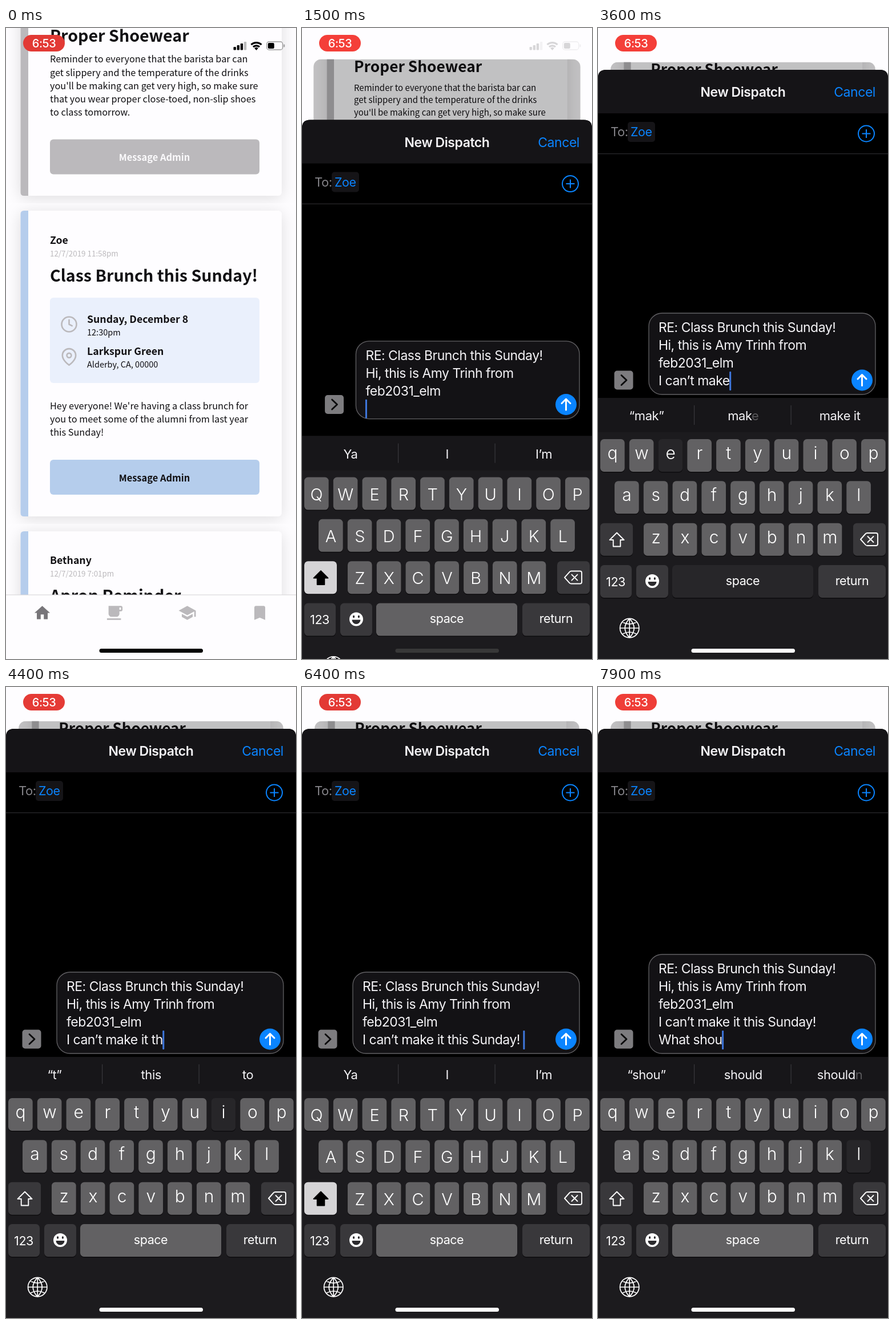
Recreate the animation shown at these times as an HTML page. Size 508 by 1102 pixels, loop 8 s.

```html
<!DOCTYPE html>
<html lang="en">
<head>
<meta charset="utf-8">
<title>Message admin</title>
<style>
html, body { margin: 0; height: 100%; overflow: hidden; background: #fefdff; }
svg { display: block; width: 100vw; height: 100vh; }
text { font-family: Inter, "Liberation Sans", sans-serif; letter-spacing: -.45px; white-space: pre; }
.card text { font-family: "Noto Sans CJK JP", "Noto Sans CJK SC", "Noto Sans CJK", sans-serif; letter-spacing: 0; }
.shadow { filter: drop-shadow(0 4px 14px rgba(0, 0, 0, .13)); }
</style>
</head>
<body>
<svg id="stage" viewBox="0 0 508 1102"></svg>
<script>
const INK = '#111013', GREY = '#bbb9bc', SKY = '#b5cdec', BLUE = '#0a84ff', WHITE = '#fefdff';
const LOOP = 8000, PRESS = 110, RELEASE = 25;

const rect = (x, y, w, h, r, fill, more = '') =>
  `<rect x="${x}" y="${y}" width="${w}" height="${h}" rx="${r}" fill="${fill}" ${more}/>`;
const text = (x, y, s, size, fill = INK, more = '') =>
  `<text x="${x}" y="${y}" font-size="${size}" fill="${fill}" ${more}>${s}</text>`;
const line = (d, color, w, more = '') =>
  `<path d="${d}" fill="none" stroke="${color}" stroke-width="${w}" ${more}/>`;
const MID = 'text-anchor="middle"', BOLD = 'font-weight="600"', ROUND = 'stroke-linecap="round" stroke-linejoin="round"';

// ---- Feed behind the sheet ----
const paragraph = (y, lines) => lines.map((s, i) => text(77, y + i * 23.2, s, 16.3)).join('');
const button = (y, fill, ink, id) =>
  `<g id="${id}">${rect(77, y, 367, 61, 6, fill)}${text(260, y + 37.5, 'Message Admin', 16.4, ink, MID + ' ' + BOLD)}</g>`;
const card = (y, h, color, from, to, body) => `
  <clipPath id="cell${to}"><rect y="${from}" width="508" height="${to - from}"/></clipPath>
  <g class="card" clip-path="url(#cell${to})">
    ${rect(25.5, y, 457.5, h, 6, WHITE, 'class="shadow"')}
    <path d="M39 ${y}H31.5q-6 0-6 6v${h - 12}q0 6 6 6H39z" fill="${color}"/>${body}
  </g>`;
const head = (y, name, date, title) =>
  text(77, y, name, 17.7, INK, BOLD) + text(77, y + 21.5, date, 13.4, GREY) + text(77, y + 66, title, 28.6, INK, BOLD);
const place = (y, a, b) => text(142, y, a, 17.7, INK, BOLD) + text(142, y + 22, b, 14.5);
const tab = (x, d, fill = GREY) =>
  `<path transform="translate(${x - 16.3} 1005.2) scale(1.36)" fill="${fill}" d="${d}"/>`;

const feed = rect(0, 0, 508, 1102, 0, WHITE)
  + card(-300, 593, GREY, -320, 306,
    text(77, 24, 'Proper Shoewear', 28.6, INK, BOLD)
    + paragraph(60.3, ['Reminder to everyone that the barista bar can', 'get slippery and the temperature of the drinks',
      'you\'ll be making can get very high, so make sure', 'that you wear proper close-toed, non-slip shoes', 'to class tomorrow.'])
    + button(194.5, GREY, '#fbfafc', 'oldButton'))
  + card(319, 534, SKY, 306, 866,
    head(377, 'Zoe', '12/7/2019 11:58pm', 'Class Brunch this Sunday!')
    + rect(77, 471, 367, 149, 6, '#eaf0fc')
    + `<g transform="translate(94.9 501.9) scale(1.3)">${line('M2 12a10 10 0 1 0 20 0a10 10 0 1 0-20 0M12 6v6l4 2', GREY, 2, ROUND)}</g>`
    + `<g transform="translate(94.9 558.8) scale(1.3)">${line('M21 10c0 7-9 13-9 13s-9-6-9-13a9 9 0 0 1 18 0zM9 10a3 3 0 1 0 6 0a3 3 0 1 0-6 0', GREY, 2, ROUND)}</g>`
    + place(514.5, 'Sunday, December 8', '12:30pm') + place(571, 'Larkspur Green', 'Alderby, CA, 00000')
    + paragraph(666, ['Hey everyone! We\'re having a class brunch for', 'you to meet some of the alumni from last year', 'this Sunday!'])
    + button(754, SKY, INK, 'button'))
  + card(879, 500, SKY, 866, 1400, head(936, 'Bethany', '12/7/2019 7:01pm', 'Apron Reminder'))
  + rect(0, 990, 508, 112, 0, WHITE) + rect(0, 989.5, 508, 1, 0, '#d5d4d6')
  + tab(63.5, 'M10 20v-6h4v6h5v-8h3L12 3 2 12h3v8z', '#777579')
  + tab(190.5, 'M20 3H4v10c0 2.2 1.8 4 4 4h6c2.2 0 4-1.8 4-4v-3h2c1.1 0 2-.9 2-2V5c0-1.1-.9-2-2-2zm0 5h-2V5h2zM2 21h18v-2H2z')
  + tab(317.5, 'M5 13.2v4L12 21l7-3.8v-4L12 17zM12 3L1 9l11 6 9-4.9V17h2V9z')
  + tab(444.5, 'M17 3H7c-1.1 0-2 .9-2 2v16l7-3 7 3V5c0-1.1-.9-2-2-2z');

const status = [0, 1, 2, 3].map(i => rect(398.5 + i * 6.1, 33 - i * 3, 4.4, 5.5 + i * 3, 1, i < 3 ? '#000' : '#bbb')).join('')
  + line('M429.5 29.2a13 13 0 0 1 18 0M433 33a8 8 0 0 1 11 0', '#000', 3.2)
  + '<path d="M435.2 35.3a5 5 0 0 1 6.6 0L438.5 39z"/>'
  + rect(456.7, 24, 28, 14, 4, 'none', 'stroke="#999" stroke-width="1.3"')
  + rect(458.8, 26, 11, 10, 2, '#000') + rect(486.3, 28.5, 2, 5, 1, '#999');

// ---- Message sheet ----
const sheet = '<path d="M0 1300V87q0-14 14-14H494q14 0 14 14V1300z"/>'
  + '<path d="M0 149V87q0-14 14-14H494q14 0 14 14V149z" fill="#151417"/>'
  + text(254, 120, 'New Dispatch', 23, '#f4f3f6', MID + ' ' + BOLD) + text(486, 120, 'Cancel', 23, BLUE, 'text-anchor="end"')
  + text(22, 189, 'To:', 22, '#858489') + rect(52, 164, 48, 35, 5, '#151417') + text(57, 189, 'Zoe', 21.5, BLUE)
  + rect(0, 219, 508, 1.2, 0, '#2b2a2d')
  + line('M456 184.5a14 14 0 1 0 28 0a14 14 0 1 0-28 0M462.5 184.5h15M470 177v15', BLUE, 2);

document.getElementById('stage').innerHTML = `
  <defs>
    <clipPath id="screen"><rect id="screenBox" width="508" height="1102"/></clipPath>
    <clipPath id="inside"><rect id="insideBox"/></clipPath>
  </defs>
  ${rect(0, 0, 508, 1102, 0, WHITE)}
  <g id="feed"><g clip-path="url(#screen)">${feed}${rect(0, 0, 508, 1102, 0, '#000', 'id="dim"')}</g></g>
  <g id="status">${status}</g>
  ${rect(30, 12, 73, 29, 14.5, '', 'id="pill"')}${text(66.5, 33.7, '6:53', 20, '#fff', MID + ' font-weight="500"')}
  <g id="sheet">${sheet}</g>
  <g id="more">${rect(28.5, 598.5, 33, 33, 5, '#7d7c7f')}${line('M41 606.5l9 8.5l-9 8.5', '#0b0b0c', 2.8, ROUND)}</g>
  ${rect(0, 0, 0, 0, 23, '#131215', 'id="bubble" stroke="#626164" stroke-width="1.3"')}
  <g clip-path="url(#inside)"><g id="message">
    ${['RE: Class Brunch this Sunday!', 'Hi, this is Amy Trinh from', 'feb2031_elm', '', ''].map((s, i) =>
      text(106, 33 + i * 31, s, 23, '#f4f3f6', `id="row${i}" style="letter-spacing:-.52px"`)).join('')}
    ${rect(0, 0, 3, 33, 1, '#3f77dd', 'id="caret"')}
  </g></g>
  <g id="send"><circle cx="462.5" cy="615" r="18.5" fill="${BLUE}"/>${line('M462.5 624.5v-18M455 613l7.5-7.5l7.5 7.5', '#fff', 3, ROUND)}</g>
  <g id="board"><g id="keys"></g></g>
  ${rect(163.5, 1084, 181.5, 7, 3.5, '', 'id="bar"')}`;

const $ = Object.fromEntries([...document.querySelectorAll('[id]')].map(e => [e.id, e]));
const set = (el, attrs) => { for (const k in attrs) el.setAttribute(k, attrs[k]); };
const move = (el, x, y, s = 1) => el.setAttribute('transform', `translate(${x} ${y}) scale(${s})`);

// ---- Typing ----
// [time the key is released, key]
const strokes = [
  [2270, 'I'], [2420, ' '], [2560, 'c'], [2680, 'a'], [2800, 'n'], [2920, 't'], [3050, ' '],
  [3200, 'm'], [3330, 'a'], [3460, 'k'], [3590, 'e'], [3680, ' '], [3820, 'i'], [3950, 't'], [4080, ' '],
  [4230, 't'], [4370, 'h'], [4500, 'i'], [4640, 's'], [4780, ' '], [4920, 'shift'], [5040, 'S'], [5160, 'u'],
  [5270, 'n'], [5390, 'd'], [5510, 'a'], [5630, 'y'], [5820, '123'], [6080, '!'], [6280, ' '], [6680, 'return'],
  [6920, 'W'], [7030, 'h'], [7140, 'a'], [7250, 't'], [7380, ' '], [7510, 's'], [7630, 'h'], [7750, 'o'], [7870, 'u'], [7990, 'l']];

// Text after ~ is still fading in
const hints = [
  [0, 'Ya|I|I’m'], [2380, '“I”|I’m|I’ll'], [2480, 'am|have|don’t'], [2620, '“c”|can|could'], [2740, '“ca”|can|call'],
  [2860, '“can”|can’t|cannot'], [2980, '“cant”|can’t|can'], [3110, 'wait|believe|do'], [3260, '“m”|make|my'],
  [3400, '“ma”|make|may'], [3520, '“mak”|mak~e|make it'], [3740, 'it|sure|the'], [3880, '“i”|it|in'], [4010, '“it”|its|it’s'],
  [4140, 'to|today|tomorrow'], [4290, '“t”|this|to'], [4430, '“th”|this|the'], [4700, '“this”|this|things'],
  [4840, 'week|weekend|morning'], [4960, 'Week|Weekend|Morning'], [5130, 'Sunday|Weekend|Morning'],
  [5340, '“Sun”|Sunday|Sunny'], [5700, '“Sunday”|Sunday|Sundays'], [6320, 'Ya|I|I’m'], [6980, '“W”|We|What'],
  [7200, '“Wha”|What|What’s'], [7430, 'is|are|do'], [7560, '“s”|should|she'], [7800, '“sho”|should|show'], [7880, '“shou”|should|should~n']];

function typed(t) {
  let s = '', mode = 'upper';
  for (const [at, key] of strokes) {
    if (at > t) break;
    if (key === 'shift') mode = 'upper';
    else if (key === '123') mode = 'symbol';
    else if (key === 'return') { s += '\n'; mode = 'upper'; }
    else {
      s = (s + key).replace('cant ', 'can’t ').replace('! \n', '!\n');
      if (mode === 'upper') mode = 'lower';
      else if (key === ' ' && mode === 'symbol') mode = 'upper';
    }
  }
  return { lines: s.split('\n'), mode };
}

function keyboard(mode, down, words) {
  const upper = mode === 'upper', symbol = mode === 'symbol';
  const cap = (x, y, w, fill) => rect(x, y + 1.5, w, 57, 6.5, '#0d0c0e') + rect(x, y, w, 57, 6.5, fill);
  const light = k => down.includes(k) ? '#272629' : '#626163';
  const dark = k => down.includes(k) ? '#626163' : '#39383b';
  const row = (chars, x, y, w = 42.7, step = 50.78) => [...chars].map((c, i) =>
    cap(x + i * step, y, w, light(c)) + (mode === 'lower'
      ? text(x + i * step + w / 2, y + 35, c, 30, '#fff', MID + ' font-weight="300"')
      : text(x + i * step + w / 2, y + 40, c.toUpperCase(), 29, '#fff', MID + ' font-weight="300"'))).join('');
  const label = (x, s, y = 972.5) => text(x, y, s, 21.5, '#fff', MID);

  let out = rect(0, 646, 508, 900, 0, '#1c1b1e') + rect(0, 646, 508, 60, 0, '#171619')
    + rect(168, 659, 1.2, 34, 0, '#39383c') + rect(337.5, 659, 1.2, 34, 0, '#39383c');
  words.split('|').forEach((w, i) => {
    const [shown, faint = ''] = w.split('~');
    out += text(85 + i * 169.3, 685, `${shown}<tspan opacity=".3">${faint}</tspan>`, 22, '#f4f3f6', MID);
  });
  if (symbol) {
    out += row('1234567890', 4, 718) + row('-/:;()$&@"', 4, 791.3) + row('.,?!’', 80, 864.7, 63, 71.2)
      + cap(4, 864.7, 57, '#39383b') + label(32.5, '#+=', 900);
  } else {
    out += row('qwertyuiop', 4, 718) + row('asdfghjkl', 29, 791.3) + row('zxcvbnm', 80, 864.7)
      + cap(4, 864.7, 57, upper ? '#d5d4d6' : dark('shift'))
      + `<path d="M33 881.5l12.5 12.5h-6.2v11.5h-12.6v-11.5h-6.2z" fill="${upper ? '#000' : 'none'}" stroke="${upper ? '#000' : '#fff'}" stroke-width="1.9" stroke-linejoin="round"/>`;
  }
  return out + cap(447, 864.7, 57, '#39383b')
    + line('M460 893l8.5-9.5q1.3-1.5 3.2-1.5h15.3q3 0 3 3v16q0 3-3 3h-15.3q-1.900 0-3.200-1.500zM472.500 888l10 10m0-10l-10 10', '#fff', 1.9, ROUND)
    + cap(4, 938, 55, dark('123')) + label(31, symbol ? 'ABC' : '123', 974.5)
    + cap(67, 938, 56, '#39383b') + '<circle cx="95" cy="966" r="12" fill="#fff"/>'
    + '<path d="M87.500 967h15a7.500 7.500 0 0 1-15 0zM89 961.500a1.600 2.200 0 1 0 3.200 0a1.600 2.200 0 1 0-3.200 0M97.800 961.500a1.600 2.200 0 1 0 3.200 0a1.600 2.200 0 1 0-3.200 0" fill="#2b2a2d"/>'
    + cap(130, 938, 247, light(' ')) + label(253.5, 'space')
    + cap(386, 938, 118, dark('return')) + label(445, 'return')
    + line('M38.500 1048a16.700 16.700 0 1 0 33.400 0a16.700 16.700 0 1 0-33.400 0h33.400M55.200 1031.300v33.400M55.200 1031.300q-16 16.700 0 33.400q16-16.700 0-33.400M42.500 1037.500q12.700 7 25.400 0M42.500 1058.500q12.700-7 25.400 0', '#fff', 1.7);
}

// ---- Motion ----
const clamp = v => Math.max(0, Math.min(1, v));
const ease = v => { v = clamp(v); return v * v * (3 - 2 * v); };
const spring = ms => { const w = Math.max(0, ms) * .012; return ms > 740 ? 1 : 1 - (1 + w) * Math.exp(-w); };
let shownKeys = '';

function draw(t) {
  const p = spring(t - 1160), q = 1 - p;

  move($.feed, 22 * p, 59.6 * p, 1 - .0868 * p);
  set($.screenBox, { rx: p ? 24 - 10 * p : 0 });
  set($.dim, { opacity: .24 * clamp(p * 2) });
  set($.button, { opacity: 1 - .7 * (ease((t - 500) / 150) - ease((t - 680) / 250)) });
  set($.status, { opacity: 1 - ease((t - 1350) / 200) });
  const glow = (1 - Math.cos(t / 2100 * 2 * Math.PI)) / 2;
  set($.pill, { fill: `rgb(${226 + 29 * glow},${58 + 9 * glow},${53 + 7 * glow})` });
  const g = 255 * clamp((t - 1000) / 2300);
  set($.bar, { fill: `rgb(${g},${g},${g})` });

  move($.sheet, 0, 1029 * q);
  move($.board, 0, 456 * (1 - spring(t - 1217)));

  const { lines, mode } = typed(t);
  const x = 89 + 64 * q, bottom = 640 + 500 * q;
  const h = 142 - 74 * q + 31 * ease((t - 6680) / 200);
  const box = { x, y: bottom - h, width: 486 - x, height: h };
  set($.bubble, box);
  set($.insideBox, box);
  move($.message, x - 89, bottom - h);
  move($.send, 0, 500 * q);
  move($.more, 136 * q, 500 * q);
  set($.more, { opacity: clamp(p * 1.1) });
  for (const el of [$.bubble, $.message, $.send, $.more]) el.style.display = p ? '' : 'none';

  $.row3.textContent = lines[0];
  $.row4.textContent = lines[1] || '';
  const last = 2 + lines.length, row = $['row' + last];
  const width = row.textContent ? row.getComputedTextLength() : 0;
  set($.caret, { x: 105.5 + width, y: 9 + 31 * last });

  const down = strokes.filter(([at]) => t >= at - PRESS && t < at + RELEASE)
    .map(([, k]) => k.length === 1 ? k.toLowerCase() : k);
  const words = hints.filter(([at]) => at <= t).pop()[1];
  const state = mode + down + words;
  if (state !== shownKeys) {
    $.keys.innerHTML = keyboard(mode, down, words);
    shownKeys = state;
  }
}

const start = performance.now();
function tick(now) {
  draw(Math.max(0, now - start) % LOOP);
  requestAnimationFrame(tick);
}
draw(0);
requestAnimationFrame(tick);
</script>
</body>
</html>
```
